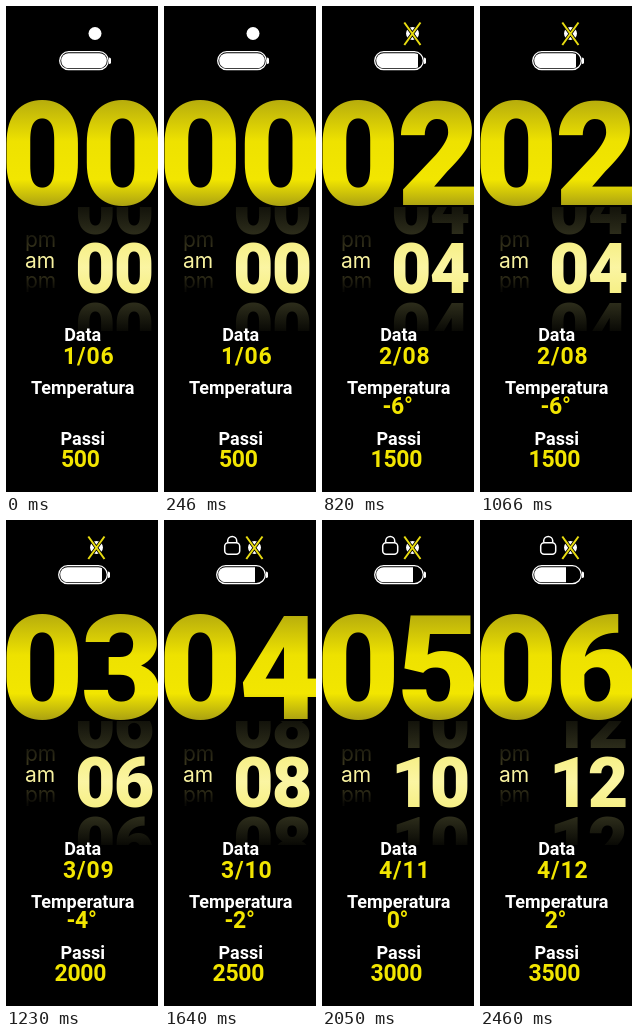
Recreate the animation shown at these times as an HTML page. Size 152 by 486 pixels, loop 2870 ms.

```html
<!DOCTYPE html>
<html lang="it">
<head>
<meta charset="utf-8">
<title>Quadrante digitale</title>
<style>
  html, body { margin: 0; width: 100%; height: 100%; overflow: hidden; background: #000; }
  svg { display: block; width: 152px; height: 486px; font-family: Roboto, sans-serif; }
  .hour { font-size: 144px; font-weight: 900; letter-spacing: -3.2px; fill: url(#hourFill); }
  .minute { font-size: 70px; font-weight: 800; letter-spacing: -1.7px; }
  .half { font: 21px Inter, sans-serif; }
  .label { font-size: 18px; font-weight: 700; fill: #fff; text-anchor: middle; }
  .value { font-size: 23px; font-weight: 700; letter-spacing: -.3px; fill: #f2e500; text-anchor: middle; }
  .date { letter-spacing: .8px; }
  .line { fill: none; stroke: #fff; stroke-width: 1.5; }
</style>
</head>
<body>
<svg viewBox="0 0 152 486">
  <defs>
    <linearGradient id="hourFill" gradientUnits="userSpaceOnUse" x1="0" y1="95" x2="0" y2="201">
      <stop offset="0" stop-color="#b8ae0c"/>
      <stop offset=".38" stop-color="#eee200"/>
      <stop offset=".74" stop-color="#f2e600"/>
      <stop offset="1" stop-color="#a89f12"/>
    </linearGradient>
    <linearGradient id="minuteFill" gradientUnits="userSpaceOnUse" x1="0" y1="236" x2="0" y2="287">
      <stop offset="0" stop-color="#f6ef86"/>
      <stop offset=".5" stop-color="#fbf5a2"/>
      <stop offset="1" stop-color="#f6ef86"/>
    </linearGradient>
    <linearGradient id="drumFade" gradientUnits="userSpaceOnUse" x1="0" y1="200" x2="0" y2="326">
      <stop offset="0" stop-color="#12120a"/>
      <stop offset=".23" stop-color="#2d2d1b"/>
      <stop offset=".77" stop-color="#2d2d1b"/>
      <stop offset="1" stop-color="#080804"/>
    </linearGradient>
    <linearGradient id="halfFade" gradientUnits="userSpaceOnUse" x1="0" y1="226" x2="0" y2="284">
      <stop offset="0" stop-color="#16150c"/>
      <stop offset=".3" stop-color="#38351c"/>
      <stop offset=".7" stop-color="#38351c"/>
      <stop offset="1" stop-color="#0a0905"/>
    </linearGradient>
    <clipPath id="drum"><rect y="201" width="152" height="124"/></clipPath>
    <clipPath id="cell"><rect x="55.2" y="47.2" width="45.6" height="15" rx="7.4"/></clipPath>
  </defs>

  <g id="lock" class="line">
    <rect x="60.7" y="22.7" width="15" height="11.6" rx="3.5"/>
    <path d="M63.7 22.5V21a4.5 4.5 0 0 1 9 0V22.5"/>
  </g>
  <circle id="radio" cx="89" cy="27.5" r="6.5" fill="#fff"/>
  <g id="cross" fill="none">
    <path d="M82.3 16.5L98.5 39M98.5 16.5L82.3 39" stroke="#000" stroke-width="3.6"/>
    <path d="M82.3 16.5L98.5 39M98.5 16.5L82.3 39" stroke="#e8dc10" stroke-width="2"/>
  </g>
  <g id="battery">
    <rect class="line" style="stroke-width:1.3" x="53.7" y="45.7" width="48.6" height="18" rx="9"/>
    <path d="M103 51.5q2 0 2 1.5v3.5q0 1.5-2 1.5z" fill="#fff"/>
    <rect id="charge" x="54" y="47" height="16" fill="#fff" clip-path="url(#cell)"/>
  </g>

  <text id="hour" class="hour" x="-5.5" y="199"/>
  <g clip-path="url(#drum)" fill="url(#drumFade)">
    <text class="minute" x="69" y="228"/>
    <text class="minute" x="69" y="347"/>
  </g>
  <text class="minute" x="69" y="286.5" fill="url(#minuteFill)"/>

  <g class="half" fill="url(#halfFade)">
    <text x="19" y="241">pm</text>
    <text x="19" y="282">pm</text>
    <text x="19" y="261.5" fill="#f8f2a0">am</text>
  </g>

  <text class="label" x="76.7" y="335">Data</text>
  <text id="date" class="value date" x="82.7" y="358"/>
  <text class="label" x="76.7" y="387.5">Temperatura</text>
  <text id="temperature" class="value" x="75.5" y="408"/>
  <text class="label" x="76.7" y="438.5">Passi</text>
  <text id="steps" class="value" x="74.3" y="461"/>
</svg>
<script>
const STEP = 410, COUNT = 7;
const byId = id => document.getElementById(id);
const pad = n => String(n).padStart(2, '0');
const write = (id, text) => { byId(id).textContent = text; };
const show = (id, visible) => { byId(id).style.display = visible ? '' : 'none'; };
const minutes = document.querySelectorAll('.minute');
let shown = -1;

function draw(i) {
  write('hour', pad(i));
  minutes.forEach(el => { el.textContent = pad(2 * i); });
  write('date', `${1 + Math.ceil(i / 2)}/${pad(6 + i)}`);
  write('temperature', i < 2 ? '' : `${2 * i - 10}°`);
  write('steps', 500 * (i + 1));

  show('lock', i >= 4);
  show('cross', i >= 2);
  byId('radio').setAttribute('cx', i < 2 ? 89 : 90.5);
  byId('battery').setAttribute('transform', `translate(${i < 2 ? 0 : -1} 0)`);
  // The charge drops every two steps.
  byId('charge').setAttribute('width', 48 - 5 * Math.floor(i / 2));
}

function tick() {
  const i = Math.floor(performance.now() / STEP) % COUNT;
  if (i !== shown) draw(shown = i);
  requestAnimationFrame(tick);
}
tick();
</script>
</body>
</html>
```
